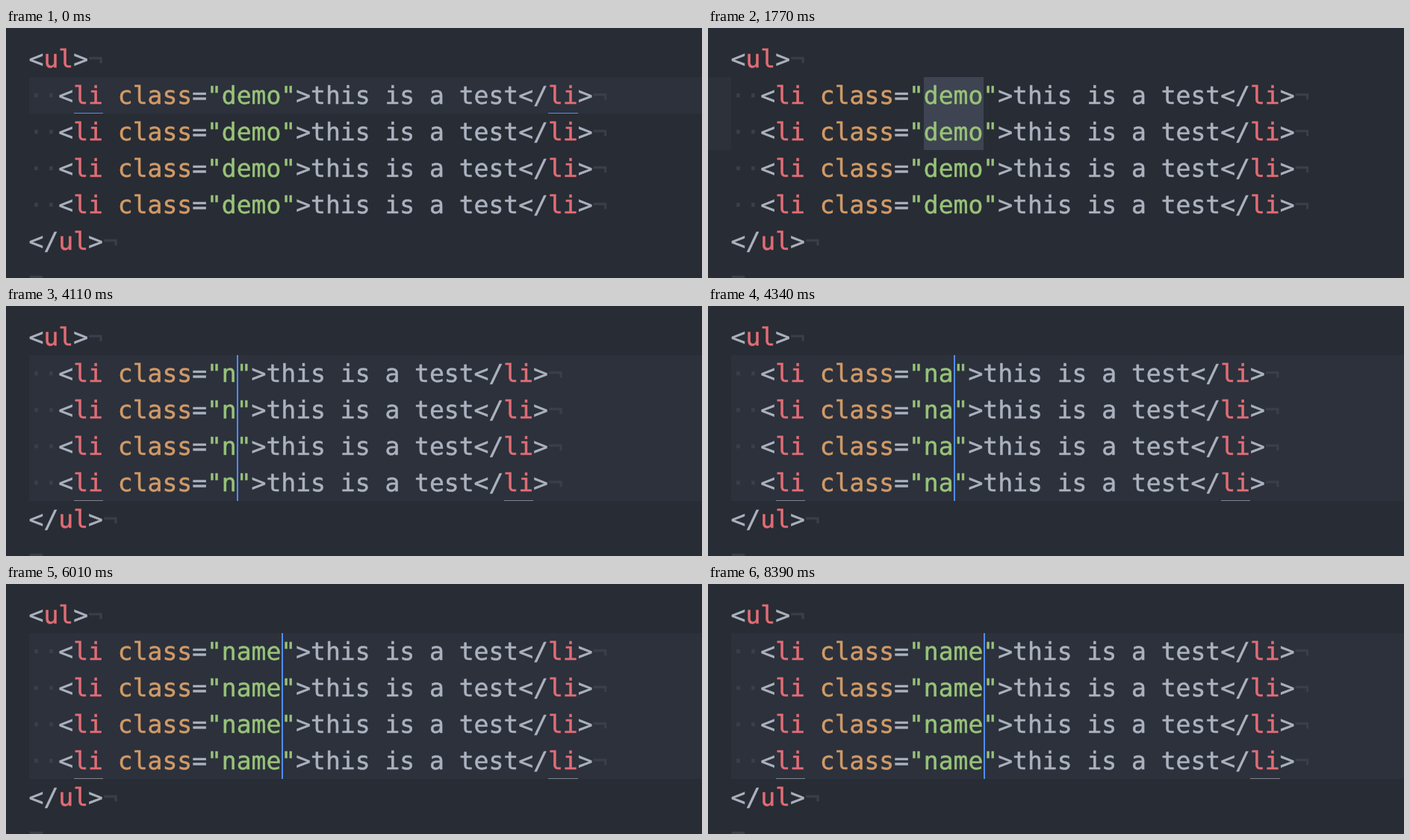
These frames come from a looping animation (932x336 px, 8630 ms). An HTML page:

```html
<!DOCTYPE html>
<html lang="en">
<head>
<meta charset="utf-8">
<title>Multiple cursors</title>
<style>
html, body { margin: 0; width: 100%; height: 100%; overflow: hidden; background: #282c34; }
svg { display: block; }
text {
  font: 33px "DejaVu Sans Mono", monospace;
  white-space: pre;
  text-rendering: geometricPrecision;
  font-variant-ligatures: none;
  stroke-width: 0.5px;
}
</style>
</head>
<body>
<svg id="stage" width="932" height="336" viewBox="0 0 932 336"></svg>
<script>
const LOOP = 8630;
const LEFT = 31, CHAR = 19.866, TOP = 17, ROW = 49;
const TEXT_LEFT = 30.6, BASE = 36;
const COLOR = {
  plain: '#abb2bf', tag: '#e06c75', attr: '#d19a66', str: '#98c379',
  hidden: '#3b4048', line: '#2c313c', gutter: '#2c313a',
  select: '#3e4451', cursor: '#528bff', match: '#7f848e'
};
// [start, state]; unset fields: word "demo", no selection, cursor hidden
const STEPS = [
  [0, {}],
  [120, { on: true }],
  [510, {}],
  [930, { on: true }],
  [1050, { picked: 1 }],
  [1770, { picked: 2 }],
  [2310, { picked: 3 }],
  [2790, { picked: 4 }],
  [4110, { word: 'n', on: true }],
  [4340, { word: 'na', on: true }],
  [4760, { word: 'nam', on: true }],
  [5120, { word: 'name', on: true }],
  [5600, { word: 'name' }],
  [6010, { word: 'name', on: true }],
  [6430, { word: 'name' }],
  [6790, { word: 'name', on: true }],
  [7210, { word: 'name' }],
  [7630, { word: 'name', on: true }],
  [8040, { word: 'name' }],
  [8390, { word: 'name', on: true }]
];

const stage = document.getElementById('stage');
const colX = col => Math.round(LEFT + col * CHAR);
const rowY = row => TOP + row * ROW;
const escape = s => s.replace(/&/g, '&amp;').replace(/</g, '&lt;').replace(/>/g, '&gt;');
const rect = (x, y, w, h, fill) =>
  `<rect x="${x}" y="${y}" width="${w}" height="${h}" fill="${fill}"/>`;

// Parts are [text, colour name] pairs, laid out on the character grid.
function textRow(row, parts) {
  let col = 0, out = '';
  for (const [s, kind] of parts) {
    const x = (TEXT_LEFT + col * CHAR).toFixed(2), c = COLOR[kind];
    out += `<text x="${x}" y="${rowY(row) + BASE}" fill="${c}" stroke="${c}">${escape(s)}</text>`;
    col += s.length;
  }
  return out;
}

function item(row, word) {
  return textRow(row, [
    ['··', 'hidden'], ['<', 'plain'], ['li', 'tag'], [' ', 'plain'],
    ['class', 'attr'], ['=', 'plain'], [`"${word}"`, 'str'],
    ['>this is a test</', 'plain'], ['li', 'tag'], ['>', 'plain'], ['¬', 'hidden']
  ]);
}

function underline(col, row, fill) {
  const x = colX(col);
  return rect(x, rowY(row + 1) - 1, colX(col + 2) - x, 1, fill);
}

function draw({ word = 'demo', picked = 0, on = false }) {
  const typing = word !== 'demo';
  const rows = typing ? 4 : 1;
  const top = rowY(1);
  let out = rect(0, 0, 932, 336, '#282c34');
  if (picked) {
    out += rect(0, top, LEFT, picked * ROW, COLOR.gutter);
    out += rect(colX(13), top, colX(17) - colX(13), picked * ROW, COLOR.select);
  } else {
    const mark = typing ? COLOR.match : COLOR.cursor;
    out += rect(LEFT, top, 901, rows * ROW, COLOR.line);
    out += underline(3, rows, mark) + underline(31 + word.length, rows, mark);
  }
  out += textRow(0, [['<', 'plain'], ['ul', 'tag'], ['>', 'plain'], ['¬', 'hidden']]);
  for (let row = 1; row <= 4; row++) out += item(row, word);
  out += textRow(5, [['</', 'plain'], ['ul', 'tag'], ['>', 'plain'], ['¬', 'hidden']]);
  out += textRow(6, [['¬', 'hidden']]);
  if (on) out += rect(colX(typing ? 13 + word.length : 13), top, 2, rows * ROW, COLOR.cursor);
  stage.innerHTML = out;
}

let shown = -1;
const begin = performance.now();
function tick() {
  const t = (performance.now() - begin) % LOOP;
  let i = STEPS.length - 1;
  while (STEPS[i][0] > t) i--;
  if (i !== shown) draw(STEPS[shown = i][1]);
  requestAnimationFrame(tick);
}
tick();
</script>
</body>
</html>
```
